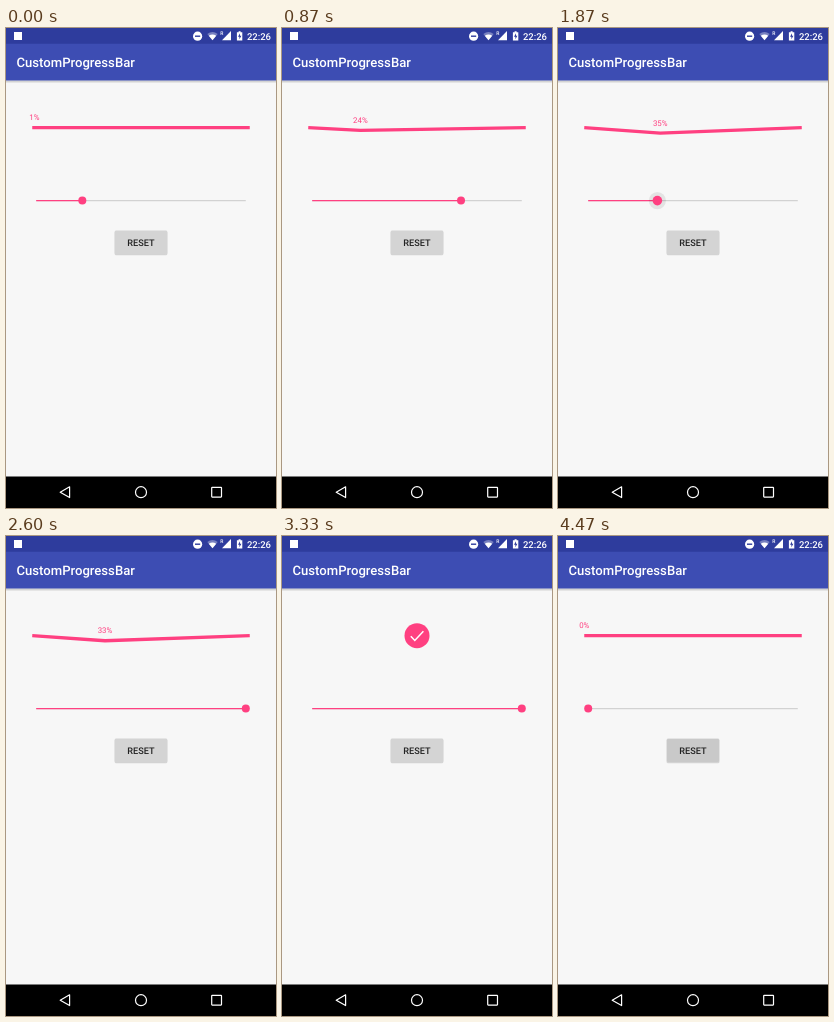
These frames come from a looping animation (270 px wide and 480 px high, 5070 ms). An HTML page:

```html
<!DOCTYPE html>
<html lang="en">
<head>
<meta charset="utf-8">
<title>CustomProgressBar</title>
<style>
  html, body { margin: 0; height: 100%; overflow: hidden; background: #f7f7f7; }
  svg { display: block; width: 100vw; height: 100vh; }
  text { font-family: Roboto, sans-serif; font-weight: 500; text-rendering: geometricPrecision; }
</style>
</head>
<body>
<svg viewBox="0 0 270 480">
  <defs>
    <linearGradient id="shade" x2="0" y2="1">
      <stop stop-color="#000" stop-opacity=".22"/>
      <stop offset="1" stop-color="#000" stop-opacity="0"/>
    </linearGradient>
  </defs>
  <rect width="270" height="480" fill="#f7f7f7"/>
  <rect y="52.5" width="270" height="3" fill="url(#shade)"/>
  <rect width="270" height="52.5" fill="#3d4db3"/>
  <rect width="270" height="15.75" fill="#2e3c9d"/>

  <!-- status bar -->
  <g fill="#fff">
    <rect x="8" y="4" width="8" height="8"/>
    <circle cx="191.6" cy="8.2" r="4.6"/>
    <rect x="189" y="7.5" width="5.2" height="1.4" fill="#2e3c9d"/>
    <path d="M201.3 6Q206.5 2 211.7 6L206.5 12.3Z" fill-opacity=".35"/>
    <path d="M202.8 7.8Q206.5 5 210.2 7.8L206.5 12.3Z"/>
    <text x="214.2" y="7" font-size="5">R</text>
    <path d="M225 3V12.3H216Z"/>
    <path d="M232.6 3.3h2v.9h1.7v8.2h-5.4V4.2h1.7Z"/>
    <path d="M234 5.2l-2 3.5h1.4v2.6l2-3.6H234Z" fill="#2e3c9d"/>
    <text x="265" y="11.7" font-size="9.5" text-anchor="end">22:26</text>
    <text x="10.5" y="39.1" font-size="13.125">CustomProgressBar</text>
  </g>

  <!-- progress -->
  <g id="rope">
    <polyline id="line" fill="none" stroke="#ff4081" stroke-width="3.3"/>
    <text id="label" font-size="7.875" text-anchor="middle" fill="#ff4081" style="font-weight:400"></text>
  </g>
  <g id="done">
    <rect id="blob" fill="#ff4081"/>
    <path id="check" d="M128.8 100.2L132.8 104.4L141.4 95.2" fill="none" stroke="#fff"
      stroke-width="1.5" pathLength="1" stroke-dasharray="1 2"/>
  </g>

  <!-- slider -->
  <path d="M30.2 172.6H239.8" stroke="#d2d2d2" stroke-width="1.4"/>
  <path id="filled" stroke="#ff4081" stroke-width="1.4"/>
  <circle id="halo" cy="172.6" r="8.6"/>
  <circle id="thumb" cy="172.6" fill="#ff4081"/>

  <!-- button -->
  <rect x="108.6" y="203" width="52.8" height="24.3" rx="1.5" fill-opacity=".14"/>
  <rect x="108.75" y="202.4" width="52.5" height="24" rx="1.4" fill="#d4d4d4"/>
  <rect id="press" x="109" y="203" width="52" height="23" rx="1.2"/>
  <text x="135" y="217.6" font-size="9.19" text-anchor="middle" fill="#222">RESET</text>

  <!-- navigation bar -->
  <rect y="448.5" width="270" height="31.5"/>
  <g fill="none" stroke="#fff" stroke-width="1.2">
    <path d="M63.6 458.8V469.6L54.2 464.2Z" stroke-linejoin="round"/>
    <circle cx="135" cy="464.2" r="5.5"/>
    <rect x="205.7" y="459.3" width="9.8" height="9.8" rx=".5"/>
  </g>
</svg>
<script>
const LOOP = 5070, FPS = 0.015, LEFT = 26.25, SPAN = 217.5, MID = 99.7;
// Each tap: when it shows, when its run began, start and end percent
const taps = [[0, -41, 0, 22], [866, 828, 22, 71], [1733, 1610, 71, 33], [2599, 2585, 33, 100]];
const RESET = 4133;

const el = id => document.getElementById(id);
const set = (id, attrs) => {
  for (const k in attrs) el(id).setAttribute(k, attrs[k]);
};
const clamp = v => Math.max(0, Math.min(1, v));
const ease = v => (1 - Math.cos(Math.PI * clamp(v))) / 2;
const mix = (a, b, v) => a + (b - a) * v;

function drawRope(p) {
  const x = LEFT + SPAN * p;
  const y = MID + 45 * Math.min(p, 1 - p) ** 2;
  set('line', { points: `${LEFT},${MID} ${x},${y} ${LEFT + SPAN},${MID}` });
  set('label', { x, y: y - 7.3 });
  el('label').textContent = p < 1 ? Math.round(p * 100) + '%' : '';
}

function drawDone(t) {
  const s = ease((t - 2930) / 400);
  const w = mix(SPAN / 2, 12.5, s), h = mix(1.65, 12.5, s ** 3);
  set('blob', { x: 135 - w, y: MID - h, width: 2 * w, height: 2 * h, rx: h });
  set('check', { 'stroke-dashoffset': 1 - clamp((t - 3200) / 130), opacity: t > 3210 ? 1 : 0 });
}

function drawSlider(value, press) {
  const x = 30.2 + 209.6 * value;
  set('filled', { d: `M30.2 172.6H${x}` });
  set('halo', { cx: x, 'fill-opacity': 0.08 * press });
  set('thumb', { cx: x, r: 4 + 0.8 * press });
}

function draw(t) {
  const [shown, start, from, to] = taps.filter(tap => tap[0] <= t).pop();
  const reset = t >= RESET - 1;
  const done = t > 2930 && !reset;
  const since = t - shown;
  el('rope').style.display = done ? 'none' : '';
  el('done').style.display = done ? '' : 'none';
  drawRope(reset ? 0 : mix(from, to, ease((t - start) / 300)) / 100);
  drawDone(t);
  drawSlider(reset ? 0 : to / 100, reset ? 0 : clamp(Math.min(since / 130, (400 - since) / 270)));
  const dark = !reset ? 0 : t > 4460 ? 0.05 : mix(0.03, 0.08, clamp((t - RESET) / 130));
  set('press', { 'fill-opacity': dark });
}

function tick() {
  const frame = Math.min(75, Math.floor((performance.now() % LOOP + 3.4) * FPS));
  draw(frame / FPS);
  requestAnimationFrame(tick);
}
tick();
</script>
</body>
</html>
```
